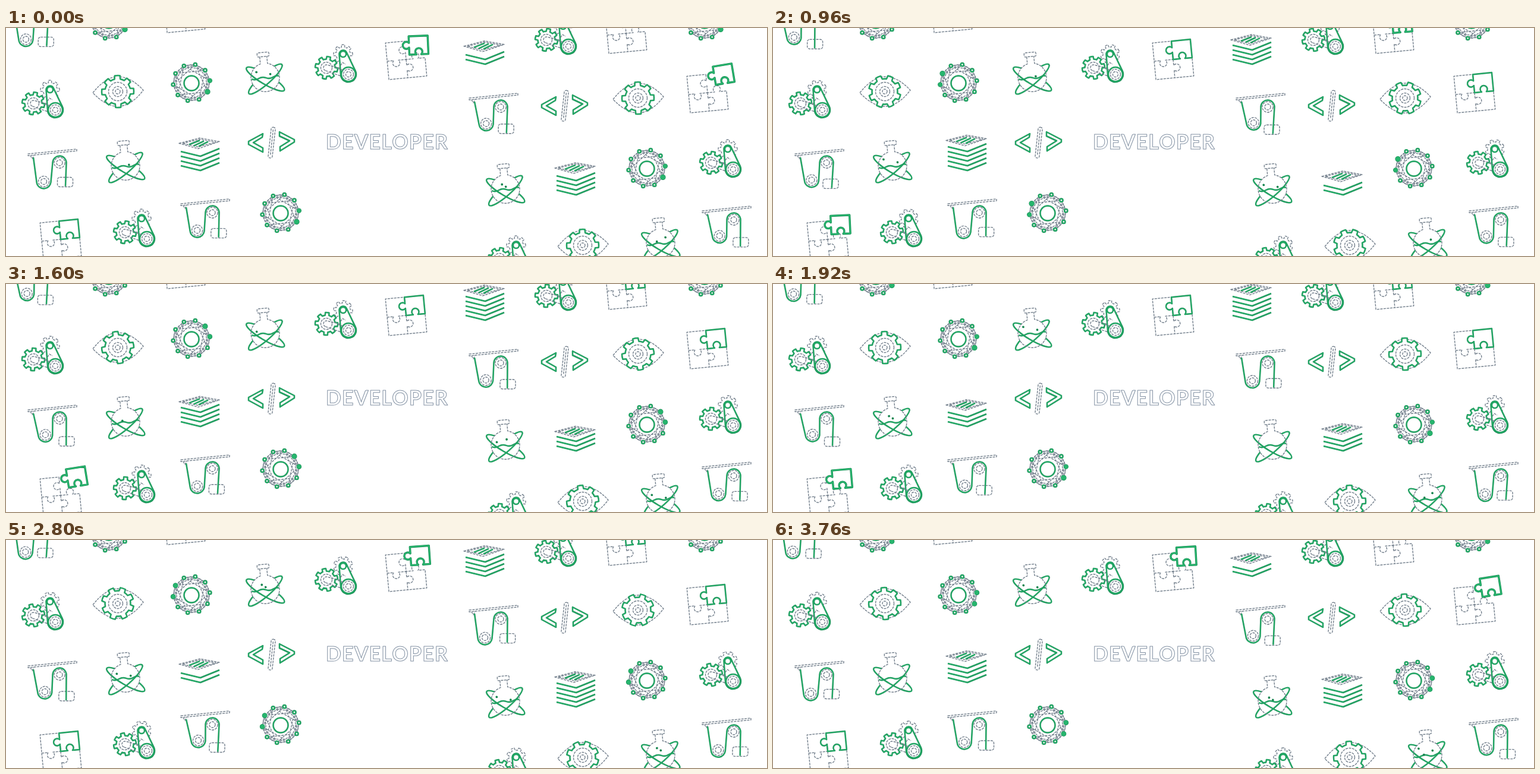
Animation of 1280x384 px, one loop 3.84 s. Source, as an HTML page with a canvas:

```html
<!DOCTYPE html>
<html lang="en">
<head>
<meta charset="utf-8">
<title>Developer banner</title>
<style>
  html, body { margin: 0; width: 100%; height: 100%; overflow: hidden; background: #fff; }
  canvas { display: block; }
</style>
</head>
<body>
<canvas id="stage" width="1280" height="384"></canvas>
<script>
const ctx = document.getElementById('stage').getContext('2d');
const GRAY = '#74808d', GREEN = '#27b56e', DARK_GREEN = '#16854f';
const TAU = Math.PI * 2, LOOP = 3840, STEP = 80, TILT = -0.095;

const wave = (t, peak, period = LOOP) => Math.cos((t - peak) / period * TAU);

function stroke(path, color, width, dash = []) {
  ctx.strokeStyle = color;
  ctx.lineWidth = width;
  ctx.setLineDash(dash);
  ctx.stroke(path);
}

// Gray lines are broken, green ones have a darker rim
function line(path, color = GRAY, filled = false, width = 2.5) {
  if (filled) { ctx.fillStyle = '#fff'; ctx.fill(path); }
  if (color === GRAY) return stroke(path, GRAY, 1.4, [4, 1.5]);
  stroke(path, DARK_GREEN, width);
  stroke(path, GREEN, width - 1.2);
}

const svg = d => new Path2D(d);

function circle(x, y, r) {
  const p = new Path2D();
  p.arc(x, y, r, 0, TAU);
  return p;
}

function box(x, y, w, h, r) {
  const p = new Path2D();
  p.roundRect(x, y, w, h, r);
  return p;
}

// Belt wrapped around two wheels
function belt(x1, y1, r1, x2, y2, r2) {
  const dir = Math.atan2(y2 - y1, x2 - x1);
  const spread = Math.acos((r1 - r2) / Math.hypot(x2 - x1, y2 - y1));
  const p = new Path2D();
  p.arc(x1, y1, r1, dir + spread, dir - spread + TAU);
  p.arc(x2, y2, r2, dir - spread, dir + spread);
  p.closePath();
  return p;
}

function cog(x, y, root, tip, turn, teeth = 8) {
  const p = new Path2D(), pitch = TAU / teeth;
  for (let i = 0; i < teeth; i++) {
    const a = turn + i * pitch;
    p.arc(x, y, tip, a - .21 * pitch, a + .21 * pitch);
    p.arc(x, y, root, a + .29 * pitch, a + .71 * pitch);
  }
  p.closePath();
  return p;
}

function gears(t) {
  const turn = t / LOOP * TAU / 4;
  line(cog(12, -18, 12, 16, -turn), GRAY, true);
  line(cog(-16, 5, 14.5, 19, turn + .2), GREEN, true);
  line(circle(-16, 5, 9.5));
  line(belt(-16, 5, 5, 21, 16, 7));
  line(belt(12, -18, 6.5, 21, 16, 13), GREEN, true);
  line(circle(12, -18, 5), GREEN);
  line(circle(21, 16, 12), GREEN);
  line(circle(21, 16, 8.5));
  line(circle(21, 16, 4.5));
  line(svg('M3 6L12 9M8 1L11-4L16-1'));
}

function eye(t) {
  ctx.rotate(-.03);
  line(svg('M-42 1Q-20-25 0-25Q22-25 43-1Q22 25 0 25Q-20 25-42 1Z'));
  line(cog(0, 0, 21.5, 27, t / LOOP * TAU / 4), GREEN, true);
  for (const r of [15.5, 8.5, 4]) line(circle(0, 0, r));
}

function network(t) {
  const spoke = TAU / 10, head = .49 + t / 1920 * TAU;
  const node = i => [31 * Math.cos(i * spoke + .52), 31 * Math.sin(i * spoke + .52)];
  const web = new Path2D();
  for (let i = 0; i < 10; i++) {
    for (const skip of [1, 2, 3]) {
      web.moveTo(...node(i));
      web.lineTo(...node(i + skip));
    }
  }
  line(web);
  line(circle(0, 0, 30));
  line(circle(0, 1, 12.5), GREEN, true);
  for (let i = 0; i < 10; i++) {
    const gap = Math.acos(Math.cos(i * spoke + .52 - head));
    const lit = gap < .63;
    const dot = circle(...node(i), lit ? 3.5 - gap : 2.6);
    line(dot, GREEN, true);
    if (lit) { ctx.fillStyle = GREEN; ctx.fill(dot); }
  }
}

// Bubble column and the time it starts to rise
const BUBBLES = [[-14, 1480], [-14, 3480], [9, 1760], [9, 3700], [-6, 80], [-14, 360],
  [3, 240], [6, 960], [-5, 2020], [-5, 2520], [1, 2700]];

function flask(t, shift) {
  ctx.rotate(TILT);
  const bulb = circle(0, 0, 24), outside = new Path2D(bulb);
  outside.rect(-60, -60, 120, 120);
  for (const angle of [.63, -.63]) {
    const orbit = new Path2D(), front = new Path2D();
    orbit.ellipse(0, 3, 37, 8.5, angle, 0, TAU);
    front.ellipse(0, 3, 37, 8.5, angle, 0, Math.PI);
    for (const [clip, part] of [[outside, orbit], [bulb, front]]) {
      ctx.save();
      ctx.clip(clip, 'evenodd');
      line(part, GREEN);
      ctx.restore();
    }
  }
  line(svg('M-6-35V-23A24 24 0 1 0 6-23V-35'));
  line(box(-10, -42, 20, 7, 2));
  line(svg('M-23 1q6 3 12 0t12 0 12 0 10-1'), GREEN);
  for (const [x, start] of BUBBLES) {
    const age = (t + shift - start + LOOP) % LOOP;
    if (age < 480) {
      ctx.fillStyle = DARK_GREEN;
      ctx.fill(circle(x, -1 - age * .025, 1.9));
    }
  }
}

function puzzle(t, peak) {
  ctx.rotate(TILT);
  line(svg('M0-31V-20a6 6 0 1 0 0 8V0H12a6 6 0 1 1 8 0H32V31H-32V-31Z'));
  line(svg('M-32 0H-21a6 6 0 1 0 8 0H0M0 0V10a6 6 0 1 1 0 8V31'));
  const out = Math.max(0, 1.15 * wave(t, peak) - .15);
  ctx.translate(16 + 14 * out, -16 - 13 * out);
  ctx.rotate(.35 * out * (.8 - out));
  ctx.translate(-16, 16);
  const piece = svg('M0-31H32V0H20a6 6 0 1 0-8 0H0V-12a6 6 0 1 1 0-8Z');
  line(piece, GREEN, out > 0, out > 0 ? 3.4 : 2.5);
}

function stack(t, peak) {
  const top = -10.7 * wave(t, peak);
  for (let y = 50; y > top + 25; y -= 8) {
    line(svg(`M-31 ${y - 8}L2 ${y}L34 ${y - 13}`), GREEN);
  }
  ctx.translate(0, top);
  line(svg('M-34 9L1 0L34 6L-2 18Z'), GRAY, true);
  line(svg('M-28 9L1 2L28 7L-2 15Z'));
  line(svg('M-17 11L1 4M-9 13L8 5M-1 14L15 6'), GREEN);
}

function pulley(t, peak) {
  const drop = wave(t, peak);
  const lowX = -13 + drop * 1.5, lowY = 47 - drop * 2.5;
  const sway = 2.5 * wave(t, peak - 350, 1280), weightY = 53.5 + drop * 3;
  line(svg('M-41 3L41-5V-2L-41 6Z'));
  line(svg('M-37 6L-34 11L-31 5'));
  const rope = svg('M-32 9');
  rope.arc(lowX, lowY, 12, 3, .12, true);
  rope.arc(12, 18, 11.5, Math.PI + .1, TAU);
  rope.lineTo(22 + sway / 2, weightY + 7);
  for (const [x, y] of [[lowX, lowY], [12, 18]]) {
    line(circle(x, y, 9));
    line(circle(x, y, 5));
  }
  line(box(8.5 + sway, weightY - 8, 26, 16, 4));
  line(rope, GREEN);
}

function code() {
  line(svg('M-15-15L-39-2V3L-15 16V9L-31 0L-16-9Z'), GREEN);
  line(svg('M13-18L38-5V-1L14 14V7L30-3L13-11Z'), GREEN);
  ctx.rotate(.11);
  line(box(-3.5, -26, 7, 52, 3));
  line(svg('M0-22V22'));
}

// x, y and the phase of each icon
const ICONS = [
  [gears, [62, 122], [216, 339], [555, 62], [925, 15], [1202, 222], [846, 384]],
  [eye, [188, 107], [1063, 118], [970, 366]],
  [network, [312, 92], [462, 311], [1078, 236], [173, -13], [1175, -13]],
  [flask, [436, 83, 0], [201, 232, 960], [840, 271, 2800], [1101, 362, 160]],
  [puzzle, [673, 53, 3250], [1180, 109, 40], [92, 356, 1520], [1043, 9, 100], [300, -26, 0]],
  [stack, [325, 190, 680], [804, 11, 1920], [957, 231, 3120]],
  [pulley, [78, 209, 1950], [335, 293, 2700], [820, 115, 700], [1212, 305, 400], [47, -29, 1200]],
  [code, [447, 193], [940, 131]],
];

function draw(t) {
  ctx.fillStyle = '#fff';
  ctx.fillRect(0, 0, 1280, 384);
  ctx.lineJoin = 'round';
  for (const [icon, ...places] of ICONS) {
    for (const [x, y, phase] of places) {
      ctx.save();
      ctx.translate(x, y);
      icon(t, phase);
      ctx.restore();
    }
  }
  ctx.font = '700 34px Lato, sans-serif';
  ctx.letterSpacing = '1.2px';
  ctx.setLineDash([]);
  ctx.lineWidth = 1;
  ctx.strokeStyle = '#8190a2';
  ctx.strokeText('DEVELOPER', 538, 204);
}

function tick() {
  draw(Math.floor(performance.now() % LOOP / STEP) * STEP);
  requestAnimationFrame(tick);
}
tick();
</script>
</body>
</html>
```
